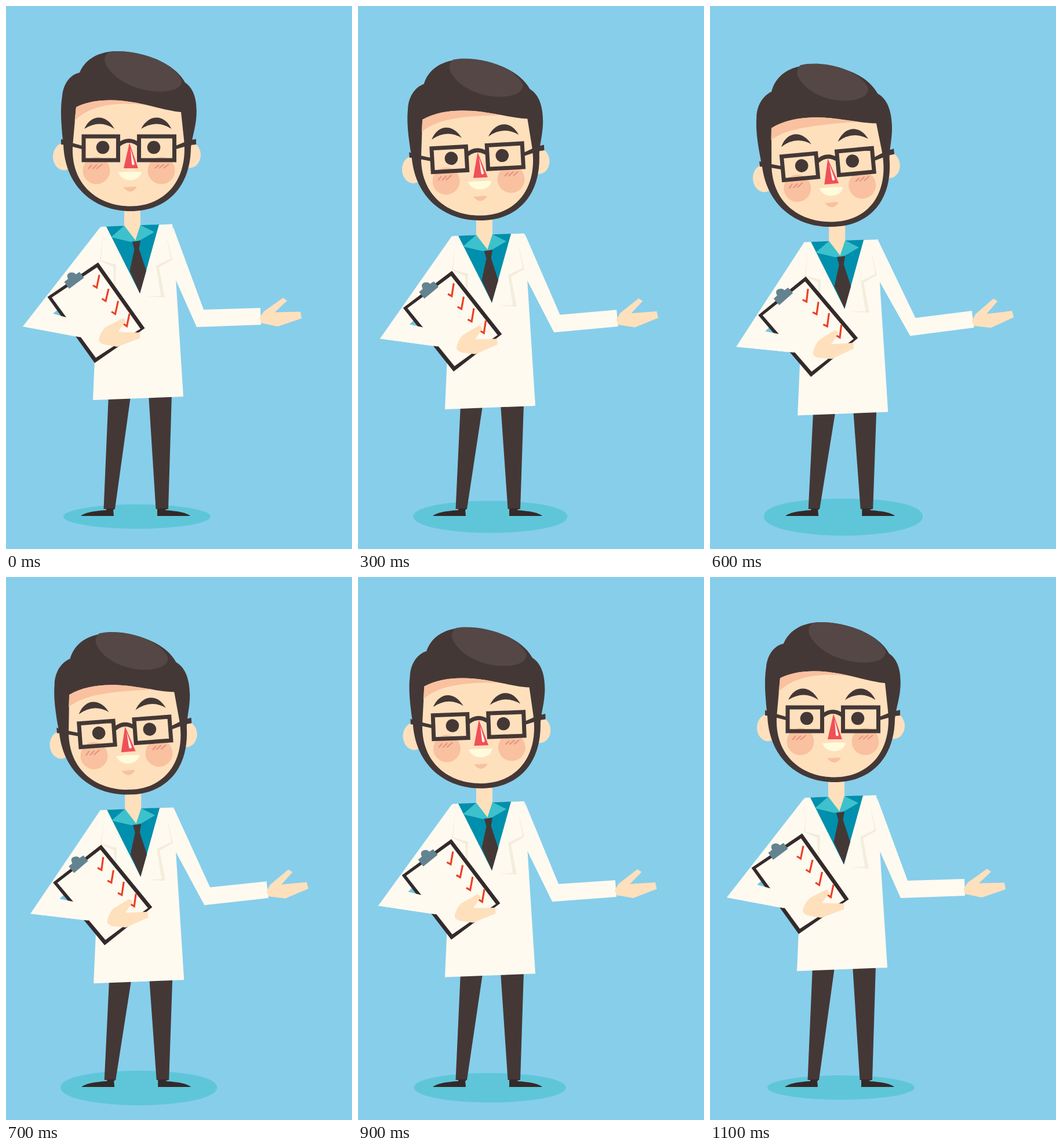
These frames come from a looping animation (597x937 px, 1.15 s). An HTML page:

```html
<!DOCTYPE html>
<html lang="en">
<head>
<meta charset="utf-8">
<title>Presenting doctor</title>
<style>
html, body { margin: 0; width: 100%; height: 100%; overflow: hidden; background: #87ceeb; }
svg { display: block; width: 100%; height: 100%; }
.dark { fill: #443836; }
.ink { fill: #332a29; }
.skin { fill: #ffe0bd; }
.white { fill: #fffaf0; }
.fold { fill: #f3eedc; }
.peach { fill: #f9c19f; }
.line { fill: none; stroke: #443836; stroke-width: 7; }
.tick { fill: none; stroke: #ee4023; stroke-width: 3.2; }
.blush { fill: none; stroke: #e59384; stroke-width: 2.2; }
</style>
</head>
<body>
<svg viewBox="0 0 597 937">
  <path id="shadow" fill="#5fc6d9"/>
  <g id="figure">
    <path id="legs" class="dark" d="M177 670H215.500L188 868H168.500ZM246 670H286L280 868H258.500Z"/>
    <path class="ink" d="M129 880Q138 872 173 870V867H188L185 870L186 880ZM261 867H280L274 870Q309 872 318 880H261Z"/>

    <g id="body">
      <g class="right-arm">
        <path class="white" d="M288.300 381L341 524L439 521L440 550L329 554L279 441.500Z"/>
        <path class="skin" d="M437.500 538L445 527L478 503.500L485 508.500L464 528.500L508 527.500L510 539L469 553L440 547Z"/>
      </g>
      <g class="left-arm">
        <path class="white" d="M162 382.500L29 553L125 571L175 540V400Z"/>
        <path fill="#79c4de" d="M81 531L88 525L105 538Z"/>
      </g>
      <path class="white" d="M163 381L287 376.500L306 674L150 680Z"/>
      <path fill="#008fac" d="M173 380.500L264 377L231 496Z"/>
      <path class="skin" d="M204 345H232V379L223 406L204 380Z"/>
      <path fill="#3dc1cc" d="M204 379L181 399L215 407L224 405ZM232 378L256 390L232 404L223 406Z"/>
      <path class="dark" d="M218 407L232 405L229.500 419L242 457L231 496L213.500 457L221.500 420Z"/>
      <path class="fold" d="M168 392L164 439L190 446L188 500H194L187 490L185 450L162 440ZM276 393L287 438L264 451L274 503L240 501L267 500L259 448L284 436Z"/>
      <g class="left-arm">
        <path class="ink" d="M159 442.500L239.500 556L153 616L71.500 502Z"/>
        <path class="white" d="M157 451L232 557L155 607L79 503Z"/>
        <path fill="#648391" d="M100.500 476L107 471Q103 462 111 460Q118 459 120 463L127 459L134.500 469L109 488Z"/>
        <path class="tick" d="M150 482L156.500 486L161 464M165.500 505L172 509L177 488M182 527.500L188.500 531.500L193.500 509M202 548L208.500 552.500L213 531"/>
        <path class="white" d="M29 553L81 531L103 537L160 550L165 575L125 571Z"/>
        <path class="skin" d="M160 576Q162 564 172 554L200 539.500Q206 540 206 545L193 562.500L231 563.500V573.500L192 588L168 584Q160 580 160 576Z"/>
      </g>
    </g>

    <g id="head">
      <ellipse class="skin" cx="100" cy="260" rx="19" ry="23.500"/>
      <ellipse class="skin" cx="317" cy="257" rx="19" ry="22.500"/>
      <path id="hair" class="dark"/>
      <path id="face" class="skin"/>
      <path id="fringe" class="peach"/>
      <path id="shine" fill="#544746" d="M178 79C167 87 168 98 180 112C200 137 245 151 277 147C295 145 304 138 303 128C290 100 240 78 190 78Z"/>
      <g class="peach">
        <circle id="leftCheek" cx="156" r="23.500"/>
        <circle id="rightCheek" cx="268" r="23.500"/>
      </g>
      <path class="blush" d="M142 281L148 274M149 281L157 274M156 281L166 273M257 280L264 274M264 280L273 273M272 280L281 273"/>
      <path id="brows" class="dark" d="M135 212C147 186 173 186 187 212Q162 195 135 212ZM233 212C247 186 273 186 285.500 212Q260 195 233 212Z"/>
      <circle class="dark" cx="167" cy="244" r="11.300"/>
      <circle class="dark" cx="255" cy="244" r="11.300"/>
      <path fill="#ef5058" d="M213 236L203 280H228Z"/>
      <path fill="#fff0e4" d="M215 246L222 273Q218 277 217 272Z"/>
      <path class="line" d="M134 225H193.500V266H134ZM229.500 225H290.500V266H229.500ZM195 239Q212 226 229 239"/>
      <path class="dark" d="M95 229.500L103 233L131 241V247L102 239.500L95 239ZM293 241L315 232L328 229.500V239L318 240L293 247Z"/>
      <g id="mouth">
        <path fill="#fffbdc" d="M194 287Q214 285 234 286C231 305 199 305 194 287Z"/>
        <path class="peach" d="M202 312Q208 313 214 312Q221 311 226 312C219 323 210 323 202 312Z"/>
      </g>
    </g>
  </g>
</svg>
<script>
const STEP = 50, STEPS = 23, PEAK = 11;
const move = (target, value) => target.setAttribute("transform", value);
const shape = (target, path) => target.setAttribute("d", path);
const byId = id => document.getElementById(id);
const [shadow, figure, legs, body, head, hair, face, fringe, shine, leftCheek, rightCheek, brows, mouth] =
  ["shadow", "figure", "legs", "body", "head", "hair", "face", "fringe", "shine", "leftCheek", "rightCheek", "brows", "mouth"].map(byId);
const rightArm = document.querySelector(".right-arm");
const leftArm = document.querySelectorAll(".left-arm");

// An oval whose ends grow blunter as it swells.
function oval(k) {
  const left = 99 - .6 * k, right = 353 + 1.4 * k;
  const top = 860 - k, bottom = 902 + 1.2 * k;
  const x = (left + right) / 2, y = 881;
  const side = .552 + .014 * k;
  const a = x - (x - left) * .552, b = x + (right - x) * (.552 - .012 * k);
  const c = y - (y - top) * side, d = y + (bottom - y) * side;
  return `M${left} ${y}C${left} ${c} ${a} ${top} ${x} ${top}S${right} ${c} ${right} ${y}` +
    `C${right} ${d} ${b} ${bottom} ${x} ${bottom}S${left} ${d} ${left} ${y}Z`;
}

// The hair stretches upwards while the jaw lags behind the tilt.
function poseHead(k) {
  const lift = .6 * k, right = .3 * k, left = -.2 * k;
  shape(hair, `M99 240C94 195 94 175 97 155C99 134 111 118 127 ${115 - lift / 2}` +
    `C135 ${95 - lift} 155 ${79 - lift} 190 ${78 - lift}C240 ${78 - lift} 292 ${100 - lift} 309 132` +
    `C325 143 330 164 328.5 190C327 212 321 226 319 245` +
    `C318 ${315 + right} 275 ${354 + right} 215 354C152 ${354 + left} 102 ${312 + left} 99 240Z`);
  shape(face, `M121 174.5C150 160 188 160 225 167C260 174 280 181 302 183L307 230` +
    `C315 ${304 + right} 271 ${345.5 + right} 215 345.5C158 ${345.5 + left} 109 ${307 + left} 115.5 236Z`);
  shape(fringe, `M121 174.5C150 160 188 160 225 167L${240 + 3 * k} ${170.8 + .65 * k}` +
    `C190 ${165 + 1.1 * k} 145 ${171 + .7 * k} 118.5 ${198 - .3 * k}Z`);
  move(shine, `translate(${237 - .3 * k} ${-.8 * k}) scale(${1 - .01 * k} 1) translate(-237 0)`);
  move(brows, `translate(0 ${-.35 * k})`);
  move(mouth, `rotate(${.35 * k} 214 290)`);
  leftCheek.setAttribute("cy", 284 + left);
  rightCheek.setAttribute("cy", 284 + right);
}

function pose(k) {
  const drop = 2.65 * k;
  shape(shadow, oval(k));
  move(figure, `translate(${k > 6 ? 1.2 : 0} 0)`);
  move(legs, `translate(0 868) scale(1 ${1 - drop / 188}) translate(0 -868)`);
  move(body, `translate(0 ${drop})`);
  move(head, `translate(0 ${drop}) rotate(${-.53 * k} 217 355)`);
  move(rightArm, `rotate(${-.54 * k} 218 388)`);
  leftArm.forEach(part => move(part, `rotate(${-.49 * k} 135 382)`));
  poseHead(k);
}

function draw() {
  const step = Math.floor(performance.now() / STEP) % STEPS;
  pose(Math.min(step, 2 * PEAK - step));
  requestAnimationFrame(draw);
}
draw();
</script>
</body>
</html>
```
